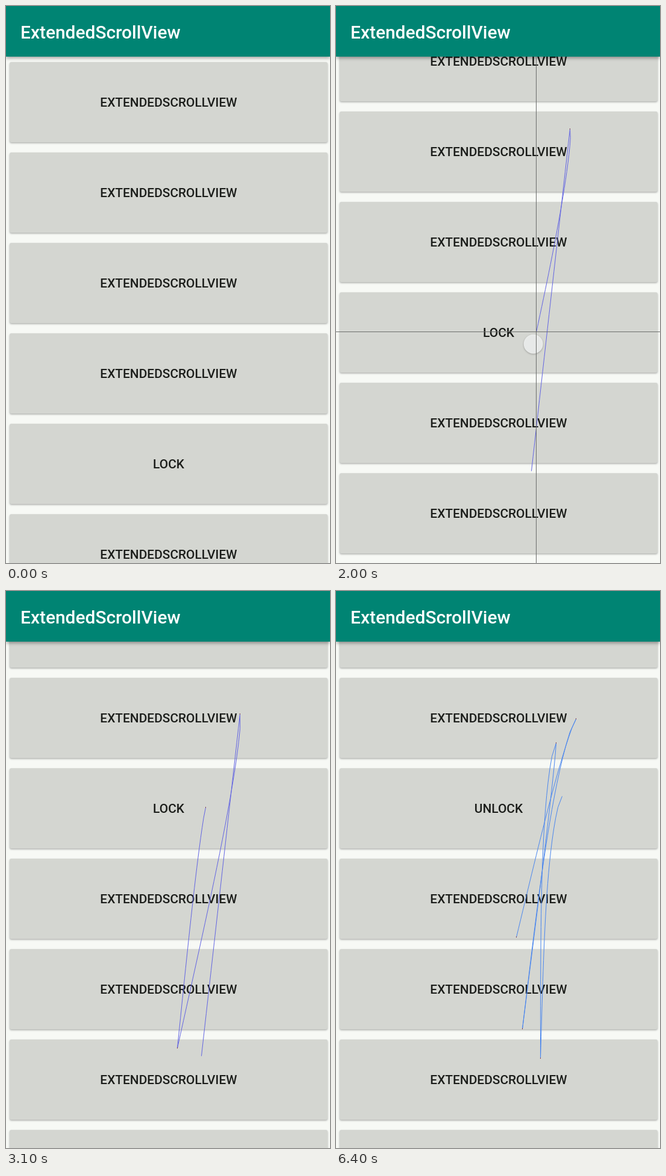
Write an HTML page with a canvas that moves like this. It is 538 px wide and 924 px high and loops after 6.8 s.

```html
<!DOCTYPE html>
<html lang="en">
<head>
<meta charset="utf-8">
<title>Scroll list with lock</title>
<style>
  html, body { margin: 0; width: 100%; height: 100%; overflow: hidden; background: #f7f9f5; }
  canvas { display: block; }
</style>
</head>
<body>
<canvas id="stage" width="538" height="924"></canvas>
<script>
const W = 538, H = 924, LOOP = 6800, STEP = 100, BAR = 84;
const ROWS = 12, PITCH = 150, FIRST = 160, LOCK_ROW = 4, LOCK_TIME = 3450;
const LOCK_HOME = FIRST + LOCK_ROW * PITCH;
const TOUCH_LEAD = 18, SAMPLES = 24;
const ctx = document.getElementById('stage').getContext('2d');

// A turning point of the finger; bow bends the stroke that leads to it.
const turn = (time, x, y, bow = 0) => ({ time, x, y, bow });

const drag = { down: 900, up: 3000, color: '#6264e2', turns: [
  turn(930, 324, 771),
  turn(1584, 388, 204),
  turn(2316, 284, 758, 10),
  turn(2797, 331, 359, -3)
] };
const tap = { down: 3350, up: LOCK_TIME, color: '#4a86ee', turns: [turn(3350, 268, 368)] };

const flickTime = i => 3650 + 310 * i;
const flicks = { down: flickTime(0), up: 5250, color: '#4a86ee', turns: [
  turn(flickTime(0), 375, 340),
  turn(flickTime(1), 339, 775, -12),
  turn(flickTime(2), 365, 252, -13),
  turn(flickTime(3), 309, 726, 2),
  turn(flickTime(4), 398, 212, -14),
  turn(flickTime(5), 299, 574, -6)
] };
const gestures = [drag, tap, flicks];

const clamp = v => Math.min(1, Math.max(0, v));
const ease = v => (1 - Math.cos(Math.PI * clamp(v))) / 2;
const mix = (a, b, f) => a + (b - a) * f;

// Point at fraction f of a stroke; the bow is widest towards the upper end.
function pointOn(a, b, f) {
  const depth = b.y > a.y ? f : 1 - f;
  return [mix(a.x, b.x, f) + b.bow * Math.sin(Math.PI * depth ** .6), mix(a.y, b.y, f)];
}

function trailAt({ turns }, t) {
  const trail = [[turns[0].x, turns[0].y]];
  for (let i = 1; i < turns.length && turns[i - 1].time < t; i++) {
    const a = turns[i - 1], b = turns[i];
    const done = ease((t - a.time) / (b.time - a.time));
    for (let k = 1; k <= SAMPLES; k++) trail.push(pointOn(a, b, done * k / SAMPLES));
  }
  return trail;
}

const penAt = (gesture, t) => trailAt(gesture, t).pop();

const lockRowY = t => t < drag.down ? LOCK_HOME
  : Math.round(Math.min(LOCK_HOME, penAt(drag, t)[1] + 1.8));

function label(text, x, y, size, color, align) {
  ctx.font = `500 ${size}px Roboto, sans-serif`;
  ctx.fillStyle = color;
  ctx.textAlign = align;
  ctx.fillText(text, x, y);
}

function withShadow(color, blur, offset, draw) {
  ctx.save();
  ctx.shadowColor = color;
  ctx.shadowBlur = blur;
  ctx.shadowOffsetY = offset;
  draw();
  ctx.restore();
}

function drawRows(t) {
  const top = lockRowY(t) - LOCK_ROW * PITCH;
  for (let i = 0; i < ROWS; i++) {
    const y = top + i * PITCH;
    withShadow('rgba(0,0,0,.3)', 3, 1.5, () => {
      ctx.fillStyle = '#d4d6d1';
      ctx.beginPath();
      ctx.roundRect(6, y - 67, 528, 133, 3);
      ctx.fill();
    });
    const text = i !== LOCK_ROW ? 'EXTENDEDSCROLLVIEW' : t < LOCK_TIME ? 'LOCK' : 'UNLOCK';
    label(text, 270, y + 7, 20.9, '#1b1d1a', 'center');
  }
}

function drawBar() {
  withShadow('rgba(0,0,0,.4)', 6, 2, () => {
    ctx.fillStyle = '#008473';
    ctx.fillRect(0, 0, W, BAR);
  });
  label('ExtendedScrollView', 24, 54, 29.9, '#fff', 'left');
}

function drawTouch(gesture, t) {
  const [x, y] = penAt(gesture, t + TOUCH_LEAD);
  withShadow('rgba(0,0,0,.3)', 3, 1, () => {
    ctx.fillStyle = 'rgba(240,242,241,.9)';
    ctx.beginPath();
    ctx.arc(x, y, 16, 0, 2 * Math.PI);
    ctx.fill();
  });
}

function drawTrail(gesture, t) {
  ctx.strokeStyle = gesture.color;
  ctx.lineWidth = 1;
  ctx.lineJoin = 'round';
  ctx.beginPath();
  trailAt(gesture, t).forEach(([x, y]) => ctx.lineTo(x + .5, y + .5));
  ctx.stroke();
  ctx.fillStyle = '#7c4058';
  for (const { time, x, y } of gesture.turns.slice(1)) {
    if (t >= time) ctx.fillRect(x, y - 1, 1, 2);
  }
}

function drawCrosshair(gesture, t) {
  const [x, y] = penAt(gesture, t).map(Math.round);
  const dark = t >= 1600 && t < 3000;
  ctx.fillStyle = dark ? '#6b6d6b' : '#4f4cec';
  ctx.fillRect(0, y, W, 1);
  ctx.fillRect(x, dark ? BAR : 0, 1, H);
}

function draw(t) {
  ctx.fillStyle = '#f7f9f5';
  ctx.fillRect(0, 0, W, H);
  drawRows(t);
  drawBar();
  const gesture = gestures.filter(g => g.down <= t).pop();
  if (!gesture) return;
  const touching = t < gesture.up;
  if (touching) drawTouch(gesture, t);
  drawTrail(gesture, t);
  if (touching) drawCrosshair(gesture, t);
}

const begin = performance.now();
function tick() {
  const t = (performance.now() - begin) % LOOP;
  draw(Math.floor(t / STEP) * STEP);
  requestAnimationFrame(tick);
}
tick();
</script>
</body>
</html>
```
